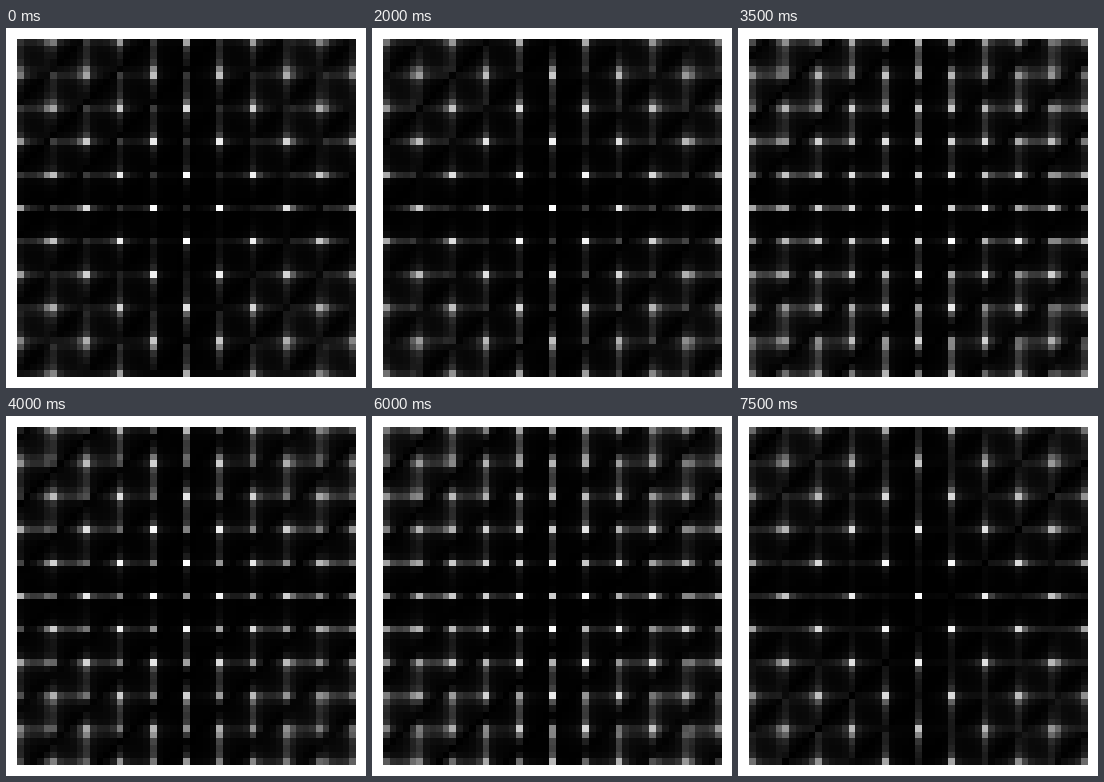
An HTML page with a canvas that plays this animation: 360 px wide and 360 px high, repeating every 8000 ms.

```html
<!DOCTYPE html>
<html>
<head>
<meta charset="utf-8">
<style>
html, body { margin: 0; width: 100%; height: 100%; overflow: hidden; background: #fff; }
canvas { display: block; }
</style>
</head>
<body>
<canvas id="stage" width="360" height="360"></canvas>
<script>
const N = 51, HALF = 25, PERIOD = 10, DOTS = 5;
const STEP = 500, STEPS = 16;
const RAD = Math.PI / 180;
const START = 163 * RAD, TURN = -35.1 * RAD;

const ctx = document.getElementById('stage').getContext('2d');
const grid = document.createElement('canvas');
grid.width = grid.height = N;
const gridCtx = grid.getContext('2d');
const pixels = gridCtx.createImageData(N, N);

// Spectrum of a finite row of evenly spaced dots
function comb(m) {
  const a = Math.PI * PERIOD * m / N;
  return m === 0 ? 1 : Math.abs(Math.sin(DOTS * a) / (DOTS * Math.sin(a)));
}
const lobes = Array.from({ length: N }, (_, i) => comb(i - HALF));

// Two dot lattices, half a period apart, with a relative phase
function spectrum(phase) {
  const out = new Float64Array(N * N);
  for (let y = 0; y < N; y++) {
    for (let x = 0; x < N; x++) {
      const m = x + y - 2 * HALF;
      const shift = phase - Math.PI * PERIOD * m / N;
      out[y * N + x] = lobes[x] * lobes[y] * Math.abs(Math.cos(shift / 2));
    }
  }
  return out;
}

function draw(step) {
  const values = spectrum(START + TURN * step);
  const low = Math.min(...values), high = Math.max(...values);
  values.forEach((v, i) => {
    const g = Math.round(255 * (v - low) / (high - low));
    pixels.data.set([g, g, g, 255], i * 4);
  });
  gridCtx.putImageData(pixels, 0, 0);
  ctx.fillStyle = '#fff';
  ctx.fillRect(0, 0, 360, 360);
  ctx.imageSmoothingEnabled = false;
  ctx.drawImage(grid, 11, 11, 339, 338);
}

let shown = -1;
const begin = performance.now();
function tick() {
  const step = Math.floor((performance.now() - begin) / STEP) % STEPS;
  if (step !== shown) draw(shown = step);
  requestAnimationFrame(tick);
}
tick();
</script>
</body>
</html>
```
